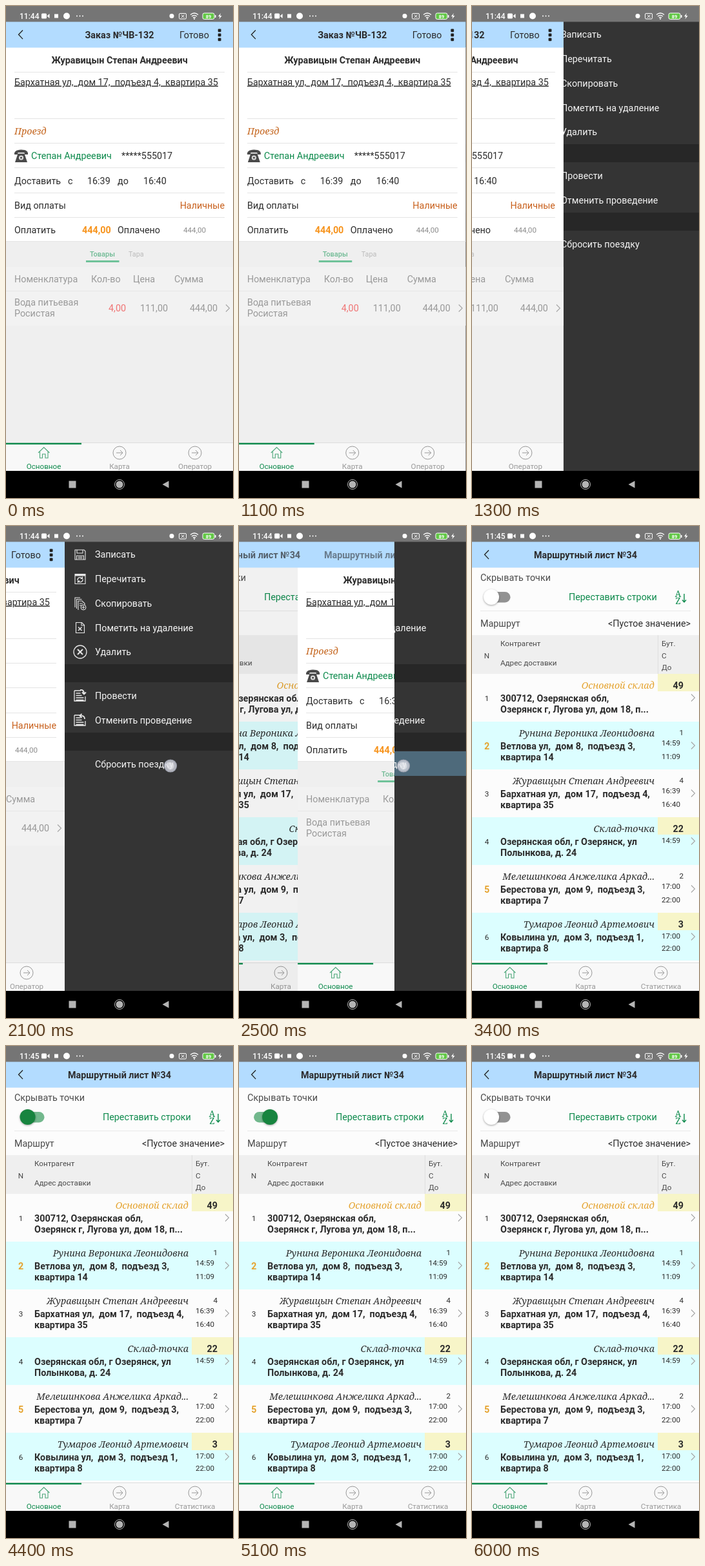
Recreate the animation shown at these times as an HTML page. Size 352x762 px, loop 6600 ms.

```html
<!DOCTYPE html>
<html lang="ru">
<head>
<meta charset="utf-8">
<title>Заказ</title>
<style>
html, body { margin: 0; width: 100%; height: 100%; overflow: hidden; background: #000; }
svg { display: block; width: 100%; height: 100%; }
text { font-family: Roboto, "Noto Sans", sans-serif; white-space: pre; }
.serif { font-family: "Noto Serif", serif; font-style: italic; }
.az { font-family: "Noto Serif", serif; }
.link { text-decoration: underline #777 .7px; text-underline-offset: 2px; }
.knob { filter: drop-shadow(0 1px 1.5px rgba(0,0,0,.35)); }
</style>
</head>
<body>
<svg id="stage" viewBox="0 0 352 762" xmlns="http://www.w3.org/2000/svg"></svg>
<script>
const LOOP = 6600, W = 352, DRAWER = 261;
const INK = '#2c2c2c', GREEN = '#0d8a4c', GREY = '#999', SKY = '#b3dcff', GOLD = '#e5a32e';
const BASE = 14.34, SMALL = 11.65;

// Drawing helpers
const rect = (x, y, w, h, fill, extra = '') =>
  `<rect x="${x}" y="${y}" width="${w}" height="${h}" fill="${fill}" ${extra}/>`;
const circle = (x, y, r, extra) => `<circle cx="${x}" cy="${y}" r="${r}" ${extra}/>`;
const line = (d, stroke, width = 1, extra = '') =>
  `<path d="${d}" fill="none" stroke="${stroke}" stroke-width="${width}" ${extra}/>`;
const shape = (d, fill) => `<path d="${d}" fill="${fill}"/>`;
const group = (id, body, extra = '') => `<g id="${id}" ${extra}>${body}</g>`;
function text(str, x, y, o = {}) {
  const safe = str.replace(/</g, '&lt;').replace(/>/g, '&gt;');
  return `<text x="${x}" y="${y}" font-size="${o.size || BASE}" fill="${o.fill || INK}"` +
    ` font-weight="${o.weight || 400}" text-anchor="${o.at || 'start'}"` +
    `${o.cls ? ` class="${o.cls}"` : ''} ${o.extra || ''}>${safe}</text>`;
}
const bold = (str, x, y, o = {}) => text(str, x, y, { weight: 700, ...o });
const small = (str, x, y, o = {}) => text(str, x, y, { size: SMALL, ...o });
const chevron = (x, y) => line(`M${x} ${y - 5.5}l5.5 5.5l-5.5 5.5`, '#a5a5a5', 1.1);

function statusBar() {
  const white = 'fill="#fff"';
  return rect(0, 0, W, 24.5, '#757575') +
    text('11:44', 21, 20, { size: 12, weight: 500, fill: '#fff', extra: 'id="clock"' }) +
    rect(55, 11.5, 8, 8, '#fff', 'rx="1.5"') + shape('M63.5 15.5l4-3.5v7z', '#fff') +
    rect(75, 12.5, 6, 6, '#fff') + circle(94, 15.5, 5, white) +
    [110, 114.5, 119].map(x => circle(x, 15.5, 1, white)).join('') +
    circle(257, 15.5, 3.5, white) +
    rect(268.5, 11.5, 11, 8.5, 'none', 'stroke="#fff" rx="1.5"') +
    line('M272 13.5l4.5 4.5m0-4.5l-4.5 4.5', '#fff') +
    line('M286 13.5q6-5 12 0M288 16q4-3.4 8 0M290 18.3q2-1.6 4 0', '#fff', 1.3) +
    circle(292, 20, 1, white) +
    rect(305, 11, 18, 9.5, '#62c846', 'stroke="#fff" rx="2.5"') + rect(324, 14, 1.5, 4, '#fff') +
    text('89', 314, 18.6, { size: 7.5, weight: 700, fill: '#fff', at: 'middle' }) +
    shape('M333 11l-4 5.2h2.6l-1.2 4.3l4.2-5.6h-2.7z', '#fff');
}

function navBar() {
  return rect(0, 720, W, 42, '#000') + rect(97.5, 735.5, 11, 11, '#b4b4b4') +
    circle(176, 741, 7.5, 'fill="none" stroke="#b4b4b4"') + circle(176, 741, 5.5, 'fill="#b4b4b4"') +
    shape('M242.5 741l10-5.5v11z', '#b4b4b4');
}

function tabBar(third) {
  const arrowTab = (label, x) =>
    circle(x, 692, 10, `fill="none" stroke="${GREY}"`) +
    line(`M${x - 5} 692h10m-4-4l4 4l-4 4`, GREY) +
    small(label, x, 716.5, { fill: GREY, at: 'middle' });
  return rect(0, 676, W, 44, '#f8f8f8') + line('M0 676.5H352', '#ddd') +
    rect(0, 676.7, 117, 2.4, GREEN) +
    line('M50 692l8.7-8.5l8.7 8.5M52.5 690.5v9.5h4v-6h4.5v6h4v-9.5', '#4aa678', 1.1) +
    small('Основное', 58.6, 716.5, { fill: GREEN, at: 'middle' }) +
    arrowTab('Карта', 176) + arrowTab(third, 293);
}

function header(id, title, extra = '') {
  return group(id, line('M26 37.5l-6.5 6.8l6.5 6.8', '#222', 1.3) +
    bold(title, 176, 50, { at: 'middle' }) + extra);
}

function orderPage() {
  const rules = [102, 174, 212, 250, 289, 327]
    .map(y => line(`M13 ${y}.5H339`, '#e4e4e4')).join('');
  const phone = shape('M13 230q-1-7 10.5-7.500q11.500 0 10.500 7.500h-5l-.5-3h-10l-.5 3z', '#4a4a4a') +
    shape('M18.500 228.500h10l4.500 13.500h-19z', '#4a4a4a') +
    circle(23.5, 235, 3.6, 'fill="#ddd"') + circle(23.5, 235, 1.6, 'fill="#4a4a4a"');
  const g = { fill: GREY };
  return rect(0, 64, W, 301, '#fff') + rect(0, 365, W, 311, '#efefef') +
    rect(0, 404, W, 91, '#f2f2f2') + line('M0 364.5H352M0 441.5H352', '#e6e6e6') + rules +
    bold('Журавицын Степан Андреевич', 176, 89, { at: 'middle' }) +
    text('Бархатная ул,  дом 17,  подъезд 4,  квартира 35', 13, 122.5, { cls: 'link' }) +
    text('Проезд', 13, 199, { cls: 'serif', fill: '#c4641c' }) + phone +
    text('Степан Андреевич', 39, 237, { fill: GREEN }) + text('*****555017', 179, 237) +
    text('Доставить', 13, 276) + text('с', 96, 276) + text('16:39', 126, 276) +
    text('до', 173, 276) + text('16:40', 213, 276) +
    text('Вид оплаты', 13, 314) + text('Наличные', 339, 314, { at: 'end', fill: '#c8601c' }) +
    text('Оплатить', 13, 351.5) + bold('444,00', 118, 351.5, { fill: '#f7941d' }) +
    text('Оплачено', 173, 351.5) + small('444,00', 275, 350.5, { fill: '#8c8c8c' }) +
    text('Товары', 130, 388, { size: 11, weight: 500, fill: '#6fba94' }) +
    rect(124, 394, 51.5, 3, '#6fc29a') + text('Тара', 190, 388, { size: 10.75, fill: '#bbb' }) +
    text('Номенклатура', 13, 427.5, g) + text('Кол-во', 132, 427.5, g) +
    text('Цена', 197, 427.5, g) + text('Сумма', 261, 427.5, g) +
    text('Вода питьевая', 13, 464, g) + text('Росистая', 13, 481, g) +
    text('4,00', 186, 473, { at: 'end', fill: '#f07474' }) +
    text('111,00', 251, 473, { at: 'end', fill: GREY }) +
    text('444,00', 328, 473, { at: 'end', fill: GREY }) + chevron(341, 468) +
    tabBar('Оператор');
}

const STOPS = [
  { name: 'Основной склад', a: '300712, Озерянская обл,', b: 'Озерянск г, Лугова ул, дом 18, п...', n: '49', sum: 1 },
  { name: 'Рунина Вероника Леонидовна', a: 'Ветлова ул,  дом 8,  подъезд 3,', b: 'квартира 14', n: '1', times: ['14:59', '11:09'], mark: 1 },
  { name: 'Журавицын Степан Андреевич', a: 'Бархатная ул,  дом 17,  подъезд 4,', b: 'квартира 35', n: '4', times: ['16:39', '16:40'] },
  { name: 'Склад-точка', a: 'Озерянская обл, г Озерянск, ул', b: 'Полынкова, д. 24', n: '22', times: ['14:59'], sum: 1 },
  { name: 'Мелешинкова Анжелика Аркад...', a: 'Берестова ул,  дом 9,  подъезд 3,', b: 'квартира 7', n: '2', times: ['17:00', '22:00'], mark: 1 },
  { name: 'Тумаров Леонид Артемович', a: 'Ковылина ул,  дом 3,  подъезд 1,', b: 'квартира 8', n: '3', times: ['17:00', '22:00'], sum: 1 }
];

function stopRow(s, i) {
  const y = 229 + 74 * i, offsets = s.sum ? [40, 59] : [37, 58];
  const num = String(i + 1);
  return rect(0, y, W, 74, i % 2 ? '#dcfeff' : '#fcfcfc') +
    (s.sum ? rect(288, y, 64, 27, '#f7f5c8') : '') +
    (s.mark ? bold(num, 23, y + 42.5, { fill: GOLD, at: 'middle' })
            : small(num, 23, y + 42, { at: 'middle' })) +
    text(s.name, 283, y + 23, { cls: 'serif', at: 'end', fill: i ? INK : GOLD }) +
    bold(s.a, 44, y + 43) + bold(s.b, 44, y + 60) +
    (s.sum ? bold(s.n, 328, y + 23, { at: 'end' }) : small(s.n, 328, y + 21, { at: 'end' })) +
    (s.times || []).map((v, k) => small(v, 294, y + offsets[k])).join('') +
    chevron(340, y + 37);
}

function listPage() {
  const c = { fill: '#4a4a4a' };
  return rect(0, 64, W, 612, '#fcfcfc') + text('Скрывать точки', 13, 85, c) +
    rect(23, 102, 36.5, 16.5, '#929292', 'rx="8.25" id="track"') +
    circle(30, 110, 12, 'id="knob" class="knob"') +
    text('Переставить строки', 150, 115, { fill: GREEN }) +
    ['A', 'Z'].map((s, i) => text(s, 319.5, 109.5 + 11 * i,
      { cls: 'az', size: 13.5, weight: 500, fill: GREEN, at: 'middle' })).join('') +
    line('M329 105v13m-3-3.500l3 3.500l3-3.500', GREEN, 1.4) +
    line('M13 131.5H339', '#e8e8e8') +
    text('Маршрут', 13, 156, c) + text('<Пустое значение>', 339, 156, { at: 'end' }) +
    rect(0, 169, W, 60, '#efefef') + line('M288.5 169V229', '#dedede') +
    small('N', 23, 204.5, { at: 'middle', ...c }) +
    small('Контрагент', 44, 186, c) + small('Адрес доставки', 44, 216, c) +
    small('Бут.', 294, 186, c) + small('С', 294, 204.5, c) + small('До', 294, 223, c) +
    STOPS.map(stopRow).join('') + tabBar('Статистика');
}

function drawer() {
  const items = [['Записать', 44], ['Перечитать', 82], ['Скопировать', 120],
    ['Пометить на удаление', 158], ['Удалить', 195], ['Провести', 263],
    ['Отменить проведение', 301], ['Сбросить поездку', 369]];
  const ink = '#e6e6e6', l = (d, w = 1.1) => line(d, ink, w);
  const sheet = y => l(`M106 ${y - 8}h10M106 ${y - 8}v16h17v-7M108.500 ${y - 4}h7m-7 3.500h9m-9 3.500h12m-12 3.500h12`, 1.3);
  const icons =
    l('M107 37h14l2 2v13h-16zM110 37v5h9v-5M109.500 52v-6h11v6m-9-4h7m-7 2h7') +
    l('M107 74.500h16v15h-16z') + rect(107, 74, 16, 3.5, ink) +
    l('M111 84a4 4 0 0 1 7-3m1 1.500a4 4 0 0 1-7 3M118.500 78.500v2.800h-3M111.500 88v-2.800h3', 1.3) +
    l('M107 126v-15h8M109.500 128v-14.500h8M112 130v-14h6l4 4v2M114 120h5m-5 3h4') +
    circle(120, 126, 4, `fill="#343434" stroke="${ink}"`) + l('M117.500 126h5m-2.500-2.500v5') +
    l('M108.500 149.500h9l4 4v12h-13zM117 149.500v4.500h4.500') + l('M112 156.500l5.500 5.500m0-5.500l-5.500 5.500', 1.5) +
    circle(115, 195, 10, `fill="none" stroke="${ink}" stroke-width="1.3"`) +
    l('M111 191l8 8m0-8l-8 8', 2) +
    sheet(263) + l('M115 254q6-1 6 6m-3-2.500l3 3l3-3', 1.8) +
    sheet(301) + l('M122 299q0-6-7-5m2.500-3l-3 3l3 3', 1.8);
  return rect(0, 24, W, 696, '#343434') + rect(0, 214, W, 28, '#272727') +
    rect(0, 320, W, 28, '#272727') + rect(91, 349, DRAWER, 38, '#4e6a7b', 'id="pressed"') +
    icons + items.map(([s, y]) => text(s, 138, y + 5, { fill: '#f4f4f4' })).join('');
}

const orderExtras = text('Готово', 269, 50) +
  [36, 43, 50].map(y => rect(328.7, y - 0.5, 4.8, 4.8, '#222', 'rx="1"')).join('');
const routeTitle = 'Маршрутный лист №34';

document.getElementById('stage').innerHTML =
  '<clipPath id="screen"><rect y="24" width="352" height="696"/></clipPath>' +
  drawer() +
  group('pages',
    group('list', listPage() + rect(0, 64, W, 656, '#000', 'id="dim"')) +
    group('order', orderPage()) +
    rect(0, 24, W, 40.5, SKY) +
    header('orderHead', 'Заказ №ЧВ-132', orderExtras) +
    header('listHead', routeTitle) +
    group('leaving', bold(routeTitle, 176, 50, { at: 'middle' })),
    'clip-path="url(#screen)"') +
  group('touch',
    circle(255, 371.5, 9.5, 'fill="#d4d6e0" fill-opacity=".8" stroke="#9fa3b0" stroke-width="1.2"') +
    circle(255, 371.5, 5.5, 'fill="#fff" fill-opacity=".45"')) +
  statusBar() + navBar();

const el = {};
document.querySelectorAll('[id]').forEach(n => el[n.id] = n);
const set = (id, attr, value) => el[id].setAttribute(attr, value);
const show = (id, on) => set(id, 'visibility', on ? 'visible' : 'hidden');
const shift = (id, x) => set(id, 'transform', `translate(${x.toFixed(2)} 0)`);

// cubic-bezier(.25, .1, .25, 1)
function ease(x) {
  if (x <= 0) return 0;
  if (x >= 1) return 1;
  let lo = 0, hi = 1;
  for (let i = 0; i < 24; i++) {
    const u = (lo + hi) / 2;
    const bx = 0.75 * u * (1 - u) + u ** 3;
    if (bx < x) lo = u; else hi = u;
  }
  const u = lo, v = 1 - u;
  return 0.3 * u * v * v + 3 * u * u * v + u ** 3;
}
const tween = (t, start, length) => ease((t - start) / length);

function render(t) {
  const open = tween(t, 1100, 400), back = tween(t, 2368, 400);
  const moving = back > 0 && back < 1;
  shift('pages', -DRAWER * (open - back));
  shift('order', W * back);
  show('order', back < 1);
  show('list', back > 0);
  set('dim', 'opacity', 0.1 * (1 - back));
  show('orderHead', back === 0);
  show('listHead', back > 0);
  shift('listHead', -117 * (1 - back));
  set('listHead', 'opacity', 0.3 + 0.7 * back);
  show('leaving', moving);
  shift('leaving', 256 * back);
  set('leaving', 'opacity', 1 - 0.8 * back);

  show('pressed', t >= 2200);
  show('touch', t >= 2100 && t < 2600);
  el.clock.textContent = t < 3100 ? '11:44' : '11:45';

  const on = t >= 4370 && t < 5180;
  const slide = tween(t, 4370, 200) - tween(t, 5120, 200);
  set('knob', 'cx', 30 + 18 * slide);
  set('knob', 'fill', on ? '#17843f' : '#fff');
  set('track', 'fill', on ? '#72b88d' : '#929292');
}

const began = performance.now();
function tick() {
  render((performance.now() - began) % LOOP);
  requestAnimationFrame(tick);
}
render(0);
requestAnimationFrame(tick);
</script>
</body>
</html>
```
